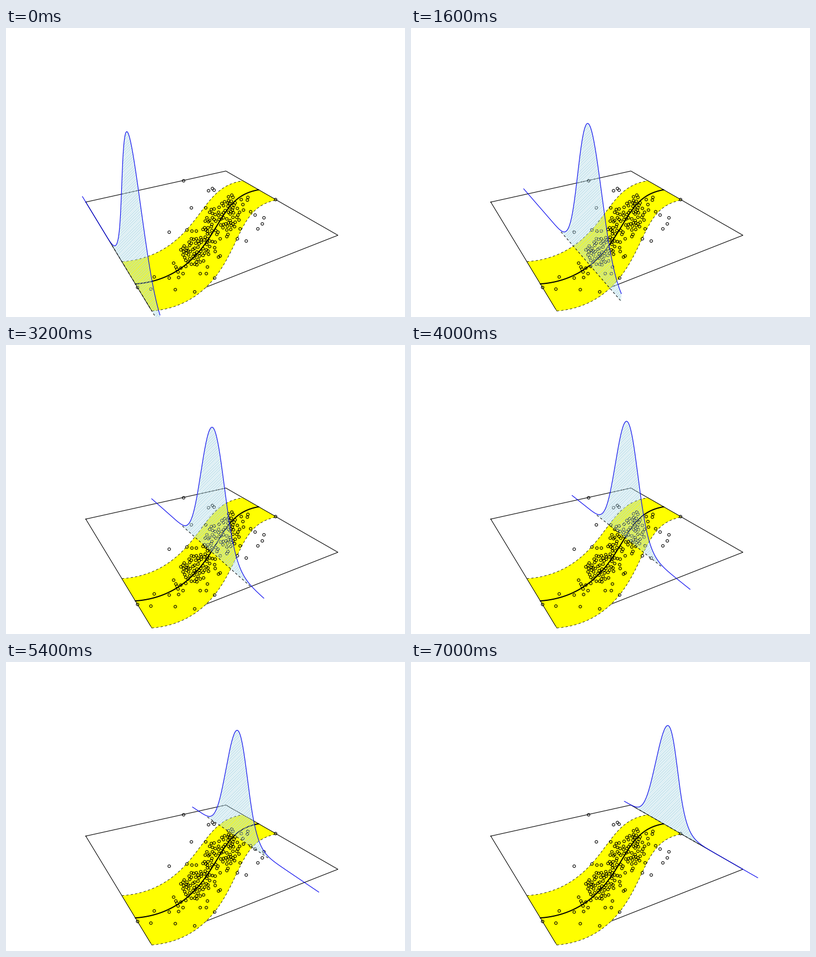
A matplotlib script for the animation above (7.2 s loop, 720 by 523 pixels).

```python
import numpy as np
import matplotlib.pyplot as plt
from matplotlib.animation import FuncAnimation
from matplotlib.collections import LineCollection
from matplotlib.path import Path

W, H, DPI = 720, 523, 64
PX = 72 / DPI                      # points per pixel
FRAMES, STEP_MS = 36, 200

# Camera: turned by 30 degrees, raised by 15, looking at a box of side 2
THETA, PHI = np.radians(30), np.radians(15)
DIST = 2 + np.sqrt(3)
SCALE, CX, CY = 659.4, 351.3, 182.8

SIGMA, PEAK = 0.21, 1.272
BAND = 0.34
Y_END = 1.174
HATCH_GAP = 1.8 * np.sqrt(2)


def project(x, y, height=0):
    """Stage position of a point above the floor of the box."""
    z = height - 1
    side = x * np.cos(THETA) - y * np.sin(THETA)
    depth = x * np.sin(THETA) + y * np.cos(THETA)
    w = DIST - z * np.sin(PHI) + depth * np.cos(PHI)
    up = z * np.cos(PHI) + depth * np.sin(PHI)
    return CX + SCALE * side / w, CY - SCALE * up / w


def mean(x):
    return -0.2894 + 0.847 * x + 0.0719 * x**2 - 0.3815 * x**3


def bell(y, mu):
    return PEAK * np.exp(-0.5 * ((y - mu) / SIGMA) ** 2)


# Scatter: a few far points, two dense clouds and a spread along the mean
rng = np.random.default_rng(4)
points = [np.array(p, float) for p in (
    (320, 276), (365, 294), (372, 290), (334, 325), (294, 369), (486, 310),
    (237, 469), (261, 472), (305, 473), (340, 477), (465, 343), (454, 363),
    (433, 385), (449, 338), (436, 306), (267, 450))]


def in_cloud(center, angle, half_len, half_width):
    r, a = np.sqrt(rng.random()), rng.uniform(0, 2 * np.pi)
    u, v = half_len * r * np.cos(a), half_width * r * np.sin(a)
    c, s = np.cos(angle), np.sin(angle)
    return np.array([center[0] + c * u - s * v, center[1] + s * u + c * v])


def near_mean():
    x = rng.uniform(-0.75, 0.7)
    return np.array(project(x, mean(x) + rng.normal(0, SIGMA)))


def scatter(count, pick):
    while count:
        p = pick()
        if min(np.hypot(*(p - q)) for q in points) > 3.6:
            points.append(p)
            count -= 1


scatter(52, lambda: in_cloud((343, 403), -0.8, 26, 25))
scatter(66, lambda: in_cloud((388, 349), -0.92, 43, 28))
scatter(50, near_mean)

fig = plt.figure(figsize=(W / DPI, H / DPI), dpi=DPI, facecolor="white")
ax = fig.add_axes([0, 0, 1, 1])
ax.set(xlim=(0, W), ylim=(H, 0))
ax.axis("off")


def stroke(xs, ys, color="black", width=1.0, z=1, dashed=False):
    style = (0, (4 / width, 4 / width)) if dashed else "-"
    line, = ax.plot(xs, ys, color=color, lw=width * PX, ls=style, zorder=z,
                    dash_capstyle="butt")
    return line


# Floor, band, mean curve and points
corners = np.array([-1, 1, 1, -1, -1]), np.array([1, 1, -1, -1, 1])
stroke(*project(*corners), width=1.1)

xs = np.linspace(-1, 1, 301)
upper = project(xs, mean(xs) + BAND)
lower = project(xs, mean(xs) - BAND)
ax.fill(np.r_[upper[0], lower[0][::-1]], np.r_[upper[1], lower[1][::-1]],
        color="yellow", lw=0, zorder=2)
for edge in (upper, lower):
    stroke(*edge, width=0.8, z=3, dashed=True)
for end in (0, -1):
    stroke(*[(a[end], b[end]) for a, b in zip(upper, lower)], width=0.8, z=3)
stroke(*project(xs, mean(xs)), width=2, z=4)
ax.plot(*np.transpose(points), "o", ms=4.8 * PX, mfc="none", mec="black",
        mew=1.1 * PX, zorder=5)

# Moving slice: hatching, dashed foot line, bell curve
starts = np.round(np.arange(0, W + H, HATCH_GAP))
hatch = LineCollection([[(s - H, H), (s, 0)] for s in starts],
                       colors="lightblue", linewidths=0.8 * PX, zorder=6)
ax.add_collection(hatch, autolim=False)
foot = stroke([], [], z=7, dashed=True)
curve = stroke([], [], "#0000ee", 1.1, z=8)


def draw(i):
    x = -1 + 2 * i / (FRAMES - 1)
    mu = mean(x)
    y = np.linspace(Y_END, -Y_END, 401)
    curve.set_data(*project(x, y, bell(y, mu)))

    y = np.linspace(min(mu + 3 * SIGMA, Y_END), max(mu - 3 * SIGMA, -Y_END), 201)
    base = np.transpose(project(x, y))
    top = np.transpose(project(x, y, bell(y, mu)))
    foot.set_data(*base.T)
    hatch.set_clip_path(Path(np.vstack([top, base[::-1], top[:1]])),
                        ax.transData)
    return hatch, foot, curve


anim = FuncAnimation(fig, draw, frames=FRAMES, interval=STEP_MS, repeat=True)
plt.show()
```
